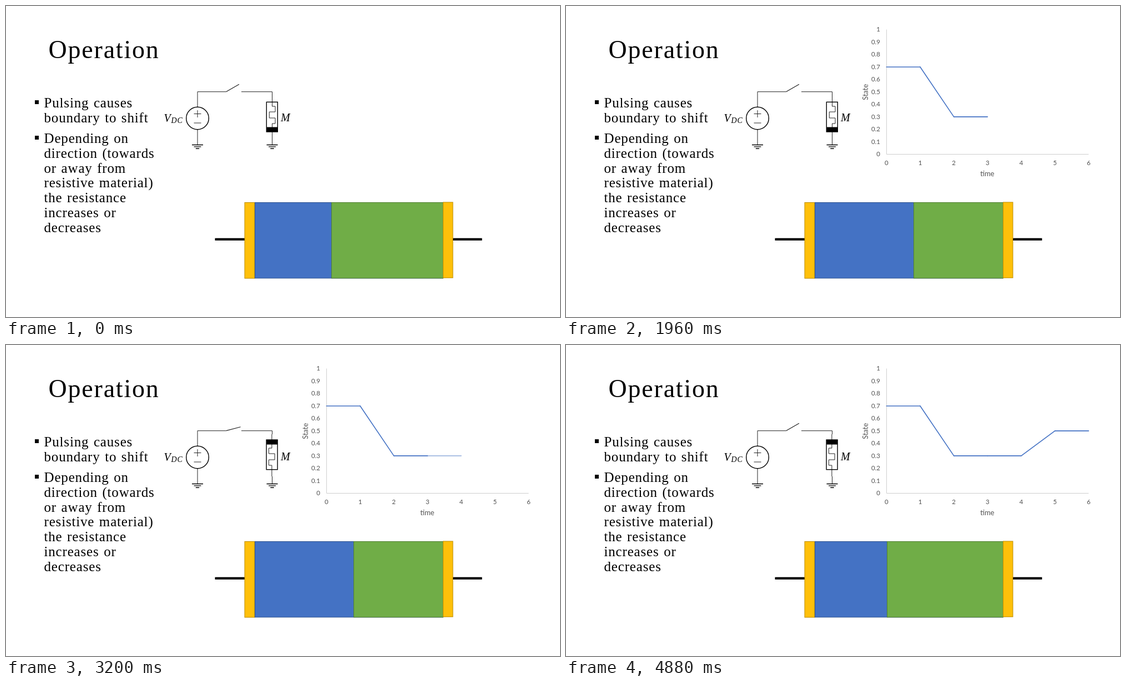
An HTML page that plays this animation: 998x561 px, repeating every 4920 ms.

```html
<!DOCTYPE html>
<html lang="en">
<head>
<meta charset="utf-8">
<title>Operation</title>
<style>
  html, body { margin: 0; width: 100%; height: 100%; overflow: hidden; background: #fff; }
  svg { display: block; width: 100vw; height: 100vh; }
  .serif { font-family: "Liberation Serif", serif; fill: #000; }
  .title { font-size: 46px; letter-spacing: 1.8px; }
  .body { font-size: 25px; letter-spacing: .83px; word-spacing: 1.5px; }
  .math { font-style: italic; font-size: 20px; }
  .sub { font-size: 14px; letter-spacing: .8px; }
  .label { font-family: Lato, sans-serif; font-size: 11.5px; fill: #525252; }
  .name { font-size: 12.9px; text-anchor: middle; }
  .wire { fill: none; stroke: #222; stroke-width: 1; }
  .bold { fill: none; stroke: #000; stroke-width: 1.4; }
  .axis { fill: none; stroke: #cfcfcf; stroke-width: 1; }
  .seg { stroke: #4472c4; stroke-width: 1.6; stroke-linecap: round; }
  .lead { stroke: #000; stroke-width: 4.2; }
  .metal { fill: #ffc00a; stroke: #bc8c00; }
  .blue { fill: #4472c4; stroke: #2f528f; }
  .green { fill: #70ad47; stroke: #507e32; }
</style>
</head>
<body>
<svg viewBox="0 0 998 561">
  <text class="serif title" x="76.5" y="94">Operation</text>
  <g id="bullets"></g>

  <!-- circuit -->
  <path class="wire" d="M345 182V154.7H396.5M424 154.7H479.5V171.5M345 223V250M479.5 234V250"/>
  <path class="wire" d="M338.5 194.5H351.5M345 188V201M338.5 211H351.5"/>
  <circle class="bold" cx="345" cy="202.5" r="20.3"/>
  <path class="bold" id="grounds"/>
  <line class="wire" id="arm" x1="396.5" y1="154.7" x2="423.5" y2="154.7" style="stroke-width:1.2"/>
  <text class="serif math" x="284.5" y="208.5">V<tspan class="sub" x="297.5" y="211">DC</tspan></text>
  <text class="serif math" x="495" y="208">M</text>
  <!-- opaque, so it hides the M while turning -->
  <g id="memristor">
    <rect x="466" y="161" width="26.5" height="76" fill="#fff"/>
    <path class="wire" d="M479.5 161V181H485V191H474.3V202H485V212H479.5V237"/>
    <rect class="bold" x="469.3" y="173.3" width="20" height="53.7"/>
    <rect x="469.3" y="218.5" width="20" height="8.5"/>
  </g>

  <!-- device -->
  <path class="lead" d="M376.5 420.8H430M805 420.8H857.5"/>
  <rect class="metal" x="430" y="354.5" width="18" height="136.7"/>
  <rect class="blue" x="448.5" y="354.5" width="339" height="136.5"/>
  <rect class="green" id="undoped" y="354.5" height="136.5"/>
  <rect class="metal" x="787.5" y="354" width="17.5" height="136.3"/>

  <g id="chart">
    <path class="axis" d="M577.5 42.5V267.5H941.5"/>
    <g id="ticks"></g>
    <text class="label name" x="759" y="307">time</text>
    <text class="label name" transform="translate(543.7 155.3) rotate(-90)">State</text>
  </g>
  <g id="curve"></g>
</svg>
<script>
const LOOP = 4920, STEP = 40;
const $ = id => document.getElementById(id);

function add(parent, tag, attrs, text) {
  const el = document.createElementNS("http://www.w3.org/2000/svg", tag);
  for (const k in attrs) el.setAttribute(k, attrs[k]);
  if (text !== undefined) el.textContent = text;
  $(parent).appendChild(el);
  return el;
}

const px = x => 577.3 + 60.7 * x;
const py = v => 267.3 - 224.8 * v;

function bullet(top, lines) {
  add("bullets", "rect", { x: 52, y: top - 13, width: 7, height: 7 });
  lines.forEach((s, i) =>
    add("bullets", "text", { class: "serif body", x: 68.5, y: top + 26.8 * i }, s));
}
bullet(183, ["Pulsing causes", "boundary to shift"]);
bullet(247, ["Depending on", "direction (towards", "or away from",
  "resistive material)", "the resistance", "increases or", "decreases"]);

$("grounds").setAttribute("d", [345, 479.5].map(x =>
  [10, 6.5, 3.2].map((r, i) => `M${x - r} ${250.5 + 3.4 * i}h${2 * r}`).join("")).join(""));

for (let i = 0; i <= 10; i++)
  add("ticks", "text", { class: "label", "text-anchor": "end", x: 566, y: py(i / 10) + 3.8 }, i / 10);
for (let i = 0; i <= 6; i++)
  add("ticks", "text", { class: "label", "text-anchor": "middle", x: px(i), y: 287 }, i);

const state = [.7, .7, .3, .3, .3, .5, .5];
// start and end of each stage, in ms
const stage = {
  chart: [60, 500],
  close1: [500, 985], shift1: [975, 1465], open1: [1465, 1955],
  flip: [1960, 2950],
  close2: [2950, 3450], shift2: [3450, 3950], open2: [3950, 4450]
};
const segStage = ["close1", "shift1", "open1", "close2", "shift2", "open2"];
const segs = segStage.map((_, i) => add("curve", "line", {
  class: "seg", x1: px(i), y1: py(state[i]), x2: px(i + 1), y2: py(state[i + 1])
}));

function draw(t) {
  const p = name => {
    const [a, b] = stage[name];
    return Math.min(1, Math.max(0, (t - a) / (b - a)));
  };
  $("chart").setAttribute("opacity", p("chart"));
  segs.forEach((s, i) => s.setAttribute("opacity", p(segStage[i])));

  const angle = -30 * (1 - p("close1") + p("open1") - p("close2") + p("open2"));
  $("arm").setAttribute("transform", `rotate(${angle} 396.5 154.7)`);
  $("memristor").setAttribute("transform", `rotate(${180 * p("flip")} 479.2 199)`);

  const edge = 586.5 + 40 * p("shift1") - 48 * p("shift2");
  $("undoped").setAttribute("x", edge);
  $("undoped").setAttribute("width", 787.5 - edge);
}

const start = performance.now();
function tick() {
  const t = (performance.now() - start) % LOOP;
  draw(Math.floor(t / STEP) * STEP);
  requestAnimationFrame(tick);
}
tick();
</script>
</body>
</html>
```
